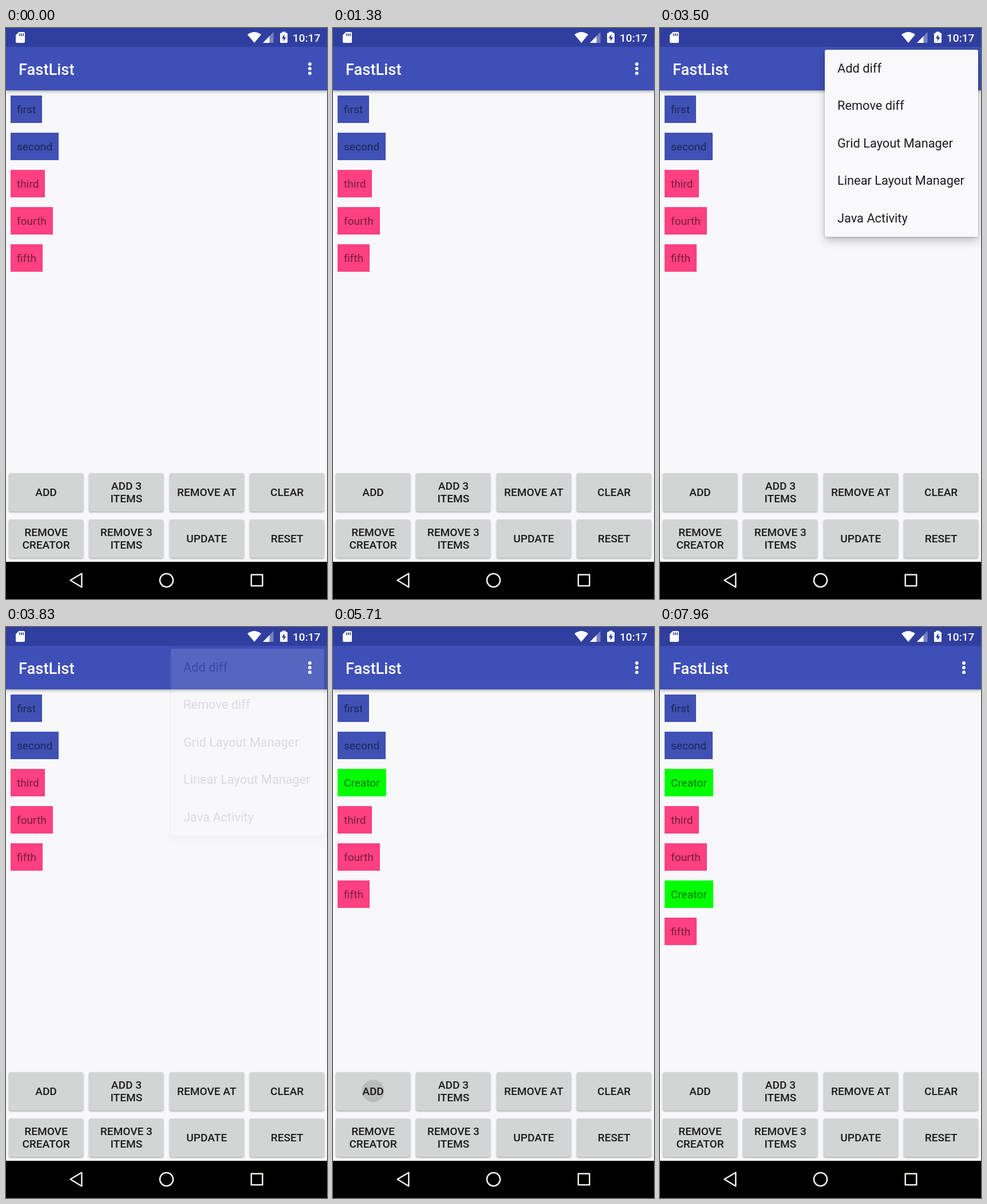
An HTML page for the animation above (8000 ms loop, 561 by 998 pixels).

```html
<!DOCTYPE html>
<html lang="en">
<head>
<meta charset="utf-8">
<title>FastList</title>
<style>
html, body { margin: 0; width: 100%; height: 100%; overflow: hidden; }
body { position: relative; background: #f8f8fb; font-family: Roboto, sans-serif; }
svg, .chip, .btn, .menu, .bar { position: absolute; }
svg { left: 0; top: 0; }

.bar { left: 0; top: 33px; width: 100%; height: 76px; background: #3e50b7; box-shadow: 0 2px 5px rgba(0,0,0,.32); }

.chip {
  left: 8px; top: calc(118px + 65px * var(--row)); height: 48px; line-height: 49px;
  padding: 0 11px; font-size: 19.1px; white-space: nowrap; color: rgba(0,0,0,.54);
}
.blue { background: #3f51b5; }
.pink { background: #ff4081; }
.green { background: #0f0; opacity: 0; }

.btn {
  left: calc(5px + 140.4px * var(--col)); top: 778px; width: 130px; height: 67px;
  display: flex; align-items: center; justify-content: center; overflow: hidden;
  border-radius: 3px; background: #d3d4d4; box-shadow: 0 1.5px 3px rgba(0,0,0,.32);
  font-size: 19.1px; font-weight: 500; line-height: 22px; text-align: center; color: #1b1b1b;
}
.low { top: 859px; }
.btn i { position: absolute; left: -10px; top: -42px; width: 150px; height: 150px; border-radius: 50%; background: #000; }

.menu {
  left: 288px; top: 38px; width: 268px; height: 327px; border-radius: 3px;
  background: #f9f9fc; box-shadow: 0 7px 16px rgba(0,0,0,.22), 0 1px 4px rgba(0,0,0,.2);
  font-size: 21.8px; color: #1d1d1f; white-space: nowrap;
}
.menu div { height: 65.45px; line-height: 66px; padding-left: 22px; }

/* timeline: 1% = 80 ms */
.down1, .down2, .in1, .in2, .btn i, .menu { animation: 8s linear infinite both; }
.down1 { animation-name: down1; }
.down2 { animation-name: down2; }
.in1 { animation-name: in1; }
.in2 { animation-name: in2; }
.btn i { animation-name: ripple; }
.menu { animation-name: menu; }

@keyframes down1 {
  0%, 58.125% { transform: none; animation-timing-function: cubic-bezier(.37,0,.63,1); }
  61.25%, 100% { transform: translateY(65px); }
}
@keyframes down2 {
  0%, 58.125% { transform: none; animation-timing-function: cubic-bezier(.37,0,.63,1); }
  61.25%, 71.875% { transform: translateY(65px); animation-timing-function: cubic-bezier(.37,0,.63,1); }
  75%, 100% { transform: translateY(130px); }
}
@keyframes in1 {
  0%, 61.25% { opacity: 0; }
  62.75%, 100% { opacity: 1; }
}
@keyframes in2 {
  0%, 75% { opacity: 0; }
  76.5%, 100% { opacity: 1; }
}
@keyframes ripple {
  0%, 57% { transform: scale(0); opacity: 0; }
  57.01% { transform: scale(.1); opacity: .12; }
  60.5% { transform: scale(1); opacity: .12; }
  63.5% { transform: scale(1); opacity: .04; }
  64.3% { transform: scale(1); opacity: 0; }
  64.31%, 70.75% { transform: scale(0); opacity: 0; }
  70.76% { transform: scale(.1); opacity: .12; }
  74.25% { transform: scale(1); opacity: .12; }
  78%, 100% { transform: scale(1); opacity: 0; }
}
@keyframes menu {
  0%, 17.5% { opacity: 0; clip-path: inset(0 0 80% 70%); }
  17.51% { opacity: .3; clip-path: inset(0 0 80% 70%); animation-timing-function: cubic-bezier(0,0,.2,1); }
  20.6%, 46.375% { opacity: 1; clip-path: inset(-30px); }
  47.875% { opacity: .13; clip-path: inset(-30px); }
  48.4%, 100% { opacity: 0; clip-path: inset(-30px); }
}
</style>
</head>
<body>
<div class="chip blue" style="--row:0">first</div>
<div class="chip blue" style="--row:1">second</div>
<div class="chip green in1" style="--row:2">Creator</div>
<div class="chip pink down1" style="--row:2">third</div>
<div class="chip pink down1" style="--row:3">fourth</div>
<div class="chip green in2" style="--row:5">Creator</div>
<div class="chip pink down2" style="--row:4">fifth</div>

<div class="btn" style="--col:0"><i></i>ADD</div>
<div class="btn" style="--col:1">ADD 3<br>ITEMS</div>
<div class="btn" style="--col:2">REMOVE AT</div>
<div class="btn" style="--col:3">CLEAR</div>
<div class="btn low" style="--col:0">REMOVE<br>CREATOR</div>
<div class="btn low" style="--col:1">REMOVE 3<br>ITEMS</div>
<div class="btn low" style="--col:2">UPDATE</div>
<div class="btn low" style="--col:3">RESET</div>

<div class="bar"></div>
<svg width="561" height="998" viewBox="0 0 561 998" fill="#fff">
  <!-- status bar -->
  <rect width="561" height="33" fill="#303f9f"/>
  <path d="M22.5 7H31q2 0 2 2V24q0 2-2 2H19q-2 0-2-2V12.5Z"/>
  <path d="M23.7 9.5v4.5M27 9.5v4.5M30.2 9.5v4.5" stroke="#303f9f" stroke-width="1.7"/>
  <path d="M422 11.5Q434 2.500 446 11.500L434 26Z"/>
  <path d="M467.500 7V26H449Z" opacity=".35"/>
  <path d="M460.500 14.200V26H449Z"/>
  <path d="M482.500 8.500V6.500H488.500V8.500H490.500Q492 8.500 492 10V24.500Q492 26 490.500 26H480.500Q479 26 479 24.500V10Q479 8.500 480.500 8.500Z"/>
  <path d="M486.500 11L481.700 18.200H484.900V23.500L489.500 16.300H486.500Z" fill="#303f9f"/>
  <text x="501" y="23.600" font-size="19.100" font-weight="500">10:17</text>
  <!-- app bar -->
  <text x="22" y="81.500" font-size="27.300" font-weight="500">FastList</text>
  <circle cx="531" cy="63" r="2.900"/><circle cx="531" cy="71" r="2.900"/><circle cx="531" cy="79.200" r="2.900"/>
  <!-- navigation bar -->
  <rect y="933" width="561" height="65" fill="#000"/>
  <g fill="none" stroke="#f1f1ec" stroke-width="2.500" stroke-linejoin="round">
    <path d="M112.500 965.300L132.300 953.500V977.200Z"/>
    <circle cx="280.500" cy="965.300" r="11.600"/>
    <rect x="428.700" y="955.500" width="19.600" height="19.600"/>
  </g>
</svg>

<div class="menu">
  <div>Add diff</div>
  <div>Remove diff</div>
  <div>Grid Layout Manager</div>
  <div>Linear Layout Manager</div>
  <div>Java Activity</div>
</div>
</body>
</html>
```
